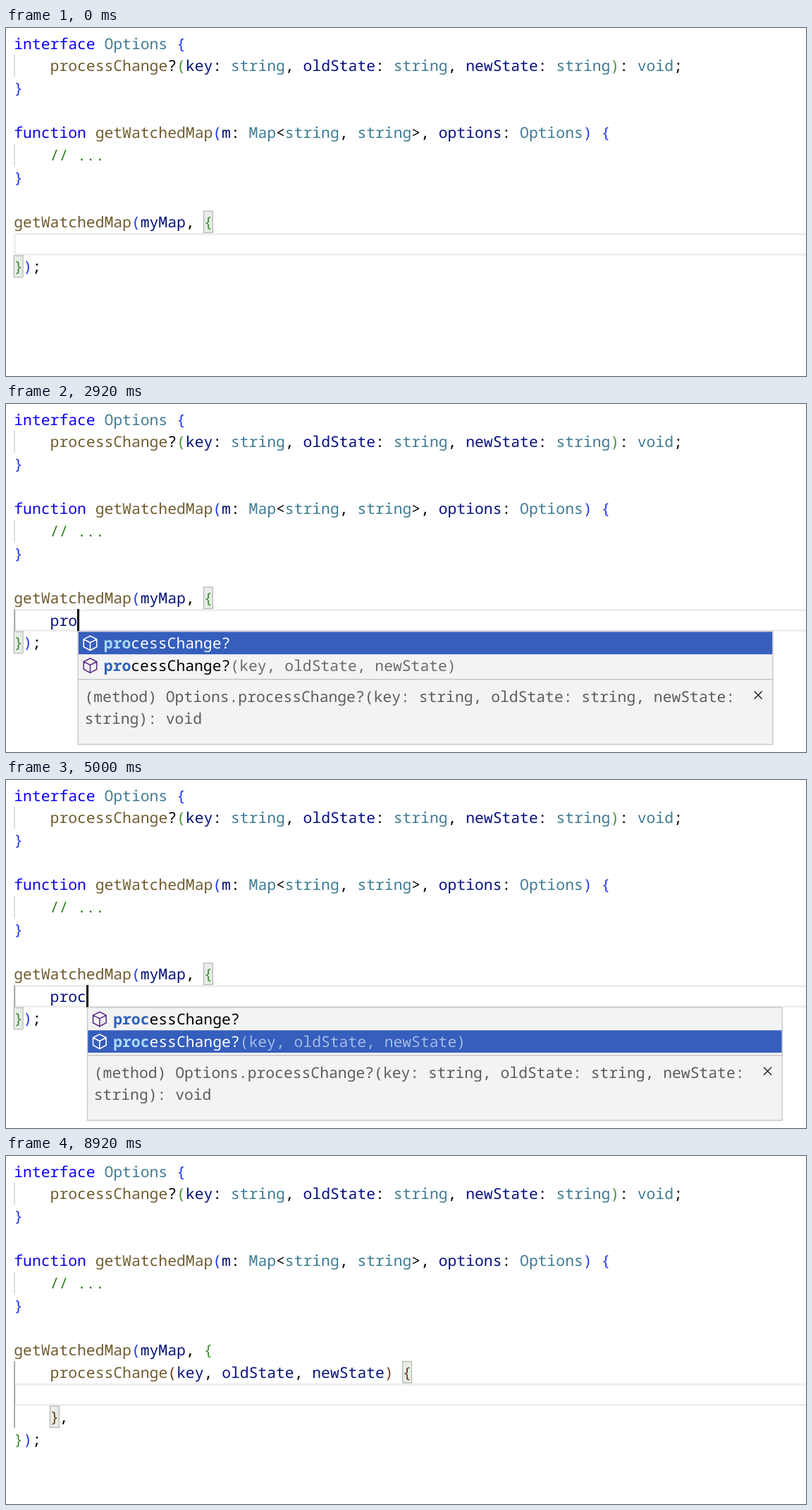
Write an HTML page that moves like this. It is 1135x494 px and loops after 9.08 s.

```html
<!DOCTYPE html>
<html lang="en">
<head>
<meta charset="utf-8">
<title>Method completion</title>
<style>
  html, body { margin: 0; width: 100%; height: 100%; overflow: hidden; background: #fff; }
  svg { display: block; width: 1135px; height: 494px; }
  text {
    font: 21.375px "Noto Sans Mono", "DejaVu Sans Mono", monospace;
    font-variant-ligatures: none;
    text-rendering: geometricPrecision;
    white-space: pre;
    fill: #000;
  }
  .k { fill: #0a00f0; }
  .t { fill: #3f7b93; }
  .f { fill: #6f5c2e; }
  .v { fill: #06117c; }
  .c { fill: #347d20; }
  .b { fill: #2238f0; }
  .g { fill: #459038; }
  .n { fill: #733c20; }
  .match { fill: #e6eee6; stroke: #b9b9b9; stroke-width: 1.3; }
  .line { fill: none; stroke: #eee; stroke-width: 3; }
  .guide { fill: #d3d3d3; }
  .active { fill: #939393; }
  .box { fill: #f3f3f3; stroke: #c8c8c8; stroke-width: 1.4; }
  .pick { fill: #355ebd; }
  .hit { font-weight: 700; fill: #2f62b9; }
  .dim { fill: #6c6c6c; }
  .doc { fill: #5c5c5c; }
  .on { fill: #fff; }
  .on .hit { fill: #a9dcfa; }
  .on .dim { fill: #a5bbe5; }
  .icon { fill: none; stroke: #5f3089; stroke-width: 1.6; stroke-linejoin: round; }
  .on .icon { stroke: #fff; }
  .close { stroke: #222; stroke-width: 1.5; }
</style>
</head>
<body>
<svg id="stage" viewBox="0 0 1135 494">
  <g id="fixed"></g>
  <g id="edit"></g>
  <rect id="caret" width="3" height="32"/>
  <g id="popup"></g>
</svg>
<script>
const LOOP = 9080, LEFT = 11.3, CHAR = 12.825, TOP = 6, ROW = 31.667, BASE = 23.5;
const WORD = 'processChange';
const BLINKS = [480, 920, 1400, 1880, 2400, 3560, 4000, 4520, 5000, 5480,
  5520, 5920, 6560, 6920, 7400, 8000, 8400, 8920];
const TYPED = [2520, 2680, 2920, 3000];
const [fixed, edit, caret, popup] =
  ['fixed', 'edit', 'caret', 'popup'].map(id => document.getElementById(id));

const colX = col => LEFT + col * CHAR;
const rowY = row => TOP + row * ROW;
const passed = (times, t) => times.filter(x => x <= t).length;
const rect = (cls, x, y, w, h) =>
  `<rect class="${cls}" x="${x}" y="${y}" width="${w}" height="${h}"/>`;

// Between tildes, the first letter names the colour class.
function words(x, y, src) {
  const spans = src.replace(/</g, '&lt;').split('~').map((s, i) =>
    i % 2 ? `<tspan class="${s[0]}">${s.slice(1)}</tspan>` : s);
  return `<text x="${x}" y="${y}">${spans.join('')}</text>`;
}
const code = (row, col, src) => words(colX(col), rowY(row) + BASE, src);
const guide = (row, rows, cls = 'guide') => rect(cls, 11.3, rowY(row), 1.5, rows * ROW);
const match = (row, col) => rect('match', colX(col) - .1, rowY(row) + .6, CHAR, ROW - 1.2);
const currentLine = row => rect('line', 12.5, rowY(row) + 1.6, 1130, ROW - 2.6);

fixed.innerHTML = [
  guide(1, 1), guide(5, 1),
  code(0, 0, '~kinterface~ ~tOptions~ ~b{~'),
  code(1, 4, `~f${WORD}~?~g(~~vkey~: ~tstring~, ~voldState~: ~tstring~, ~vnewState~: ~tstring~~g)~: ~tvoid~;`),
  code(2, 0, '~b}~'),
  code(4, 0, '~kfunction~ ~fgetWatchedMap~~b(~~vm~: ~tMap~<~tstring~, ~tstring~>, ~voptions~: ~tOptions~~b)~ ~b{~'),
  code(5, 4, '~c// ...~'),
  code(6, 0, '~b}~')
].join('');

const CALL = code(8, 0, '~fgetWatchedMap~~b(~~vmyMap~, ~g{~');

const typing = n => [
  currentLine(9), n ? guide(9, 1, 'active') : '',
  match(8, 21), match(10, 0), CALL,
  code(9, 4, `~v${WORD.slice(0, n)}~`),
  code(10, 0, '~g}~~b)~;')
].join('');

const inserted = () => [
  currentLine(10), guide(9, 3, 'active'),
  match(9, 43), match(11, 4), CALL,
  code(9, 4, `~f${WORD}~~n(~~vkey~, ~voldState~, ~vnewState~~n)~ ~n{~`),
  code(11, 4, '~n}~,'),
  code(12, 0, '~g}~~b)~;')
].join('');

function item(i, n, chosen, detail) {
  const y = 323.5 + i * 31.8;
  return `<g class="${chosen ? 'on' : ''}">` +
    (chosen ? rect('pick', 1.2, y, 984.3, 31.8) : '') +
    `<path class="icon" transform="translate(17.8 ${y + 16})"
      d="M0-10.3 9.3-5.6V5.2L0 10.3-9.3 5.2V-5.6ZM-9.3-5.6 0-.8 9.3-5.6M0-.8V10.3"/>` +
    `<text x="37.2" y="${y + BASE}" style="fill:${chosen ? '#fff' : '#000'}">` +
    `<tspan class="hit">${WORD.slice(0, n)}</tspan>${WORD.slice(n)}?` +
    `<tspan class="dim">${detail}</tspan></text></g>`;
}

function list(n, pick, docs) {
  const doc = (y, s) => `<text class="doc" x="9.8" y="${y}">${s}</text>`;
  return `<g transform="translate(${75 + (n - 1) * 40 / 3} 0)">` +
    rect('box', .5, 322.8, 985.8, 68.4) +
    item(0, n, pick === 0, '') +
    item(1, n, pick === 1, '(key, oldState, newState)') +
    (docs ? rect('box', .5, 391, 985.8, 92.2) +
      doc(422.5, `(method) Options.${WORD}?(key: string, oldState: string, newState:`) +
      doc(454.2, 'string): void') +
      '<path class="close" d="M960 407.7 971 418.7M971 407.7 960 418.7"/>' : '') +
    '</g>';
}

let shown = '';
function draw(now) {
  const t = now % LOOP;
  const n = passed(TYPED, t), done = t >= 5520, open = t >= 2600 && !done;
  const docs = t >= 2680, pick = t >= 4120 ? 1 : 0;
  const state = [n, done, open, docs, pick].join();
  if (state !== shown) {
    shown = state;
    edit.innerHTML = done ? inserted() : typing(n);
    popup.innerHTML = open ? list(n, pick, docs) : '';
    caret.setAttribute('x', Math.round(colX(done ? 8 : 4 + n)));
    caret.setAttribute('y', done ? 322 : 291);
  }
  caret.style.visibility = passed(BLINKS, t) % 2 ? 'visible' : 'hidden';
  requestAnimationFrame(() => draw(performance.now()));
}
draw(performance.now());
</script>
</body>
</html>
```
